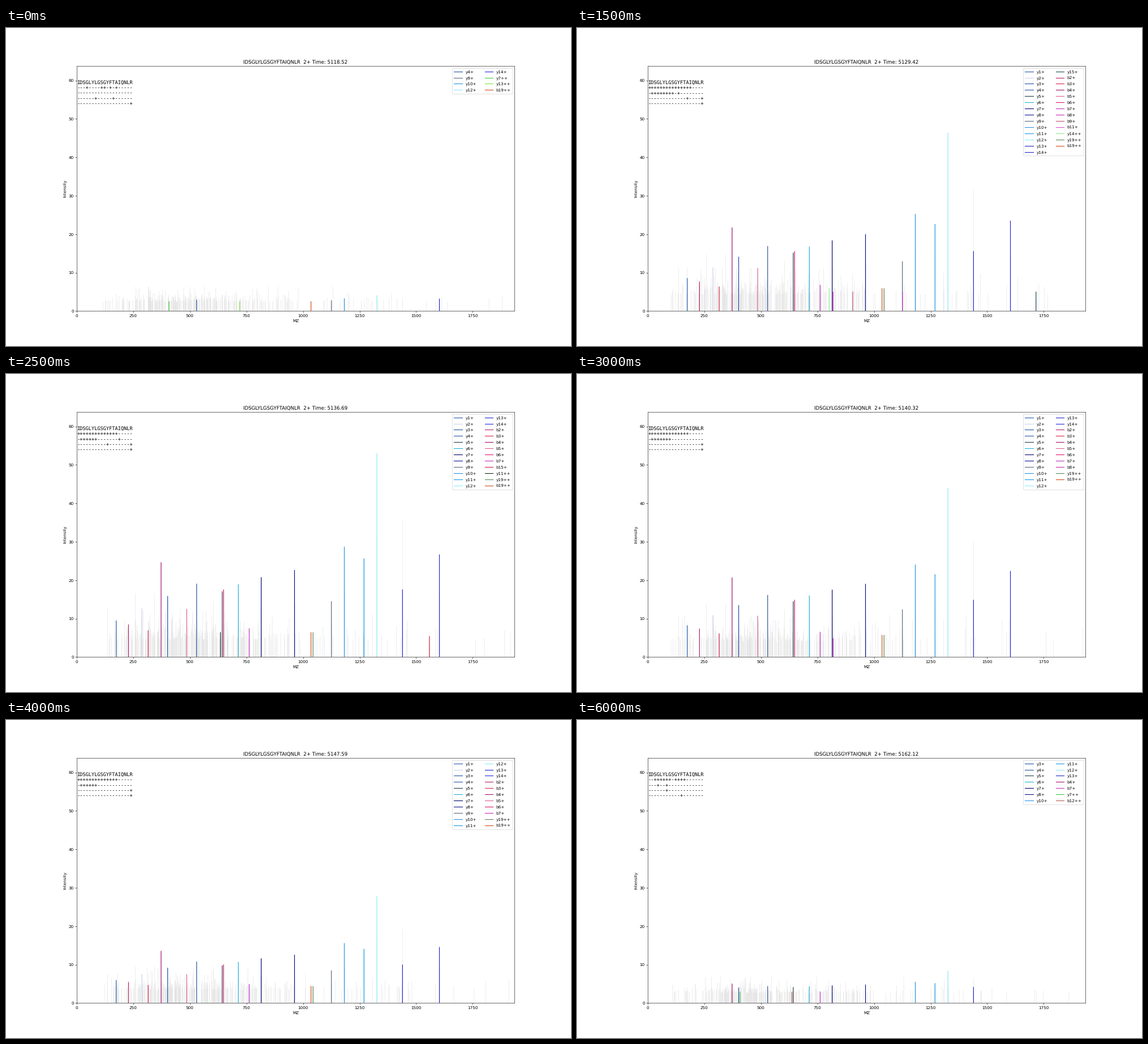
Recreate the animation shown at these times as a matplotlib script. Size 998 px wide and 561 px high, loop 6500 ms.

```python
import matplotlib.pyplot as plt
import numpy as np
from matplotlib.animation import FuncAnimation
from matplotlib.lines import Line2D

plt.rcParams["font.family"] = "DejaVu Sans"
plt.rcParams["text.hinting"] = "none"

WIDTH, HEIGHT, DPI = 998, 561, 52
SCANS, STEP_MS = 13, 500
PEPTIDE = "IDSGLYLGSGYFTAIQNLR"
MASS = dict(G=57.02146, A=71.03711, S=87.03203, T=101.04768, L=113.08406,
            I=113.08406, N=114.04293, D=115.02694, Q=128.05858,
            F=147.06841, R=156.10111, Y=163.06333)
PROTON, WATER = 1.00728, 18.01056

# Ion type and charge, in the order of the marker rows and the legend.
SERIES = [("y", 1), ("b", 1), ("y", 2), ("b", 2)]

# Positions matched in each scan, one field per series.
MATCHES = [
    "4 9-10 12 14//7 13/19",
    "3-4 6 8 10-12 14/2 4 6//19",
    "1-14 16/2-7 11/19/8 19",
    "1-15/2-9 11/14 19/19",
    "1-14/2-7 10/19/19",
    "1-14/2-7 15/11 19/19",
    "1-14/2-8/19/19",
    "2-15/2-9/14 19/19",
    "1-14/2-7/19/19",
    "1 3-14/2-7//6",
    "1 3-8 10-14/2-7//6",
    "3-8 10-13/2 4 6 7//",
    "3-8 10-13/4 7/7/12",
]

COLORS = {
    "y1+": "#2058ac", "y2+": "#ccd2ec", "y3+": "#1c4ea6", "y4+": "#2552a0",
    "y5+": "#1e3c4c", "y6+": "#1cb2d8", "y7+": "#00006e", "y8+": "#06128c",
    "y9+": "#56667c", "y10+": "#2492e6", "y11+": "#129ae6",
    "y12+": "#8ceafa", "y13+": "#1c24c8", "y14+": "#2224dc",
    "y15+": "#1e4a54", "y16+": "#b2a6f2",
    "b2+": "#b41c60", "b3+": "#d6244e", "b4+": "#a2106e", "b5+": "#e05c8c",
    "b6+": "#de166a", "b7+": "#c02cc0", "b8+": "#c428b4", "b9+": "#be5070",
    "b10+": "#b8468e", "b11+": "#d94cd8", "b15+": "#d21c3a",
    "y7++": "#3ccc3c", "y11++": "#0e2a14", "y13++": "#7ee63e",
    "y14++": "#92e892", "y19++": "#568456",
    "b6++": "#e06014", "b8++": "#d68a30", "b12++": "#b45c4a",
    "b19++": "#d04a14",
}

FLOOR = 2.4
# Key points of the elution curve and of each series' share of it.
ELUTION = [(0, 1.7), (2, 20), (3, 44), (5, 50.6), (7, 32.7), (10, 10.8), (12, 6)]
SHARE = {
    "y": [(1, .14), (4, .33), (5, .29), (8, .4), (9, .24), (10, .52),
          (11, .46), (12, 1), (13, .3), (14, .48), (15, .06)],
    "b": [(2, .12), (3, .09), (4, .44), (5, .2), (6, .3), (7, .1), (8, .06)],
}
DOUBLE_SHARE = 0.08
# Unmatched peaks that rise and fall with the peptide.
COMPANIONS = [(137, .2), (260, .28), (345, .28), (458, .2), (604, .24),
              (1308, .17), (1440.5, .66), (1586, .1)]


def along(points, x):
    return np.interp(x, *zip(*points))


def expand(field):
    for part in field.split():
        first, _, last = part.partition("-")
        yield from range(int(first), int(last or first) + 1)


def ion_mz(kind, n, charge):
    residues = PEPTIDE[-n:] if kind == "y" else PEPTIDE[:n]
    mass = sum(MASS[aa] for aa in residues) + (WATER if kind == "y" else 0)
    return mass / charge + PROTON


def ion_height(kind, n, charge, elution):
    share = along(SHARE[kind], n) if charge == 1 else DOUBLE_SHARE
    return FLOOR + share * elution


def noise(scan, elution):
    rng = np.random.default_rng(40 + scan)
    mz = np.concatenate([
        rng.uniform(105, 1000, 35),
        rng.normal(410, 130, 180),
        rng.uniform(550, 940, 70),
        rng.uniform(900, 1480, 25),
        rng.uniform(1480, 1930, 5),
    ])
    mz = mz[mz > 100]
    rise = np.minimum(rng.exponential(0.4, mz.size), 1.6)
    return list(zip(mz, (FLOOR + 0.045 * elution) * (0.95 + rise)))


def sticks(peaks, color, width, order):
    mz, height = zip(*peaks)
    ax.vlines(mz, 0, height, colors=color, linewidth=width,
              zorder=order).set_snap(False)


def draw(scan):
    ax.cla()
    elution = along(ELUTION, scan)
    gray = noise(scan, elution)
    gray += [(mz, FLOOR + share * elution) for mz, share in COMPANIONS]
    handles = []
    mono = dict(family="DejaVu Sans Mono", fontsize=12, va="baseline")
    ax.text(1, 59.08, PEPTIDE, **mono)

    for row, field in enumerate(MATCHES[scan].split("/")):
        kind, charge = SERIES[row]
        matched = list(expand(field))
        marks = "".join("+" if n in matched else "-"
                        for n in range(1, len(PEPTIDE) + 1))
        ax.text(1, 57.75 - 1.333 * row, marks, **mono)

        for n in matched:
            label = f"{kind}{n}{'+' * charge}"
            mz = ion_mz(kind, n, charge)
            height = ion_height(kind, n, charge, elution)
            sticks([(mz, height)], COLORS[label], 1.65, 2 + len(handles) / 100)
            handles.append(Line2D([], [], color=COLORS[label], label=label))
            if mz > 700 and charge == 1:
                gray.append((mz + 1, 0.6 * height))

    sticks(gray, "#e2e2e2", 0.85, 1)
    ax.set_xlim(0, 1934.6)
    ax.set_ylim(0, 63.75)
    ax.set_xlabel("MZ")
    ax.set_ylabel("Intensity")
    ax.set_title(f"{PEPTIDE}  2+ Time: {5118.524 + 3.6333 * scan:.2f}", pad=5.2)
    ax.legend(handles=handles, ncol=2, loc="upper right", labelspacing=0.575)
    return []


# The sliver of extra size keeps rounding from losing a pixel.
fig = plt.figure(figsize=((WIDTH + 0.01) / DPI, (HEIGHT + 0.01) / DPI),
                 dpi=DPI, facecolor="white")
ax = fig.add_axes([0.125, 0.11, 0.775, 0.77])

anim = FuncAnimation(fig, draw, frames=SCANS, interval=STEP_MS,
                     init_func=lambda: [], repeat=True, repeat_delay=0)
plt.show()
```
